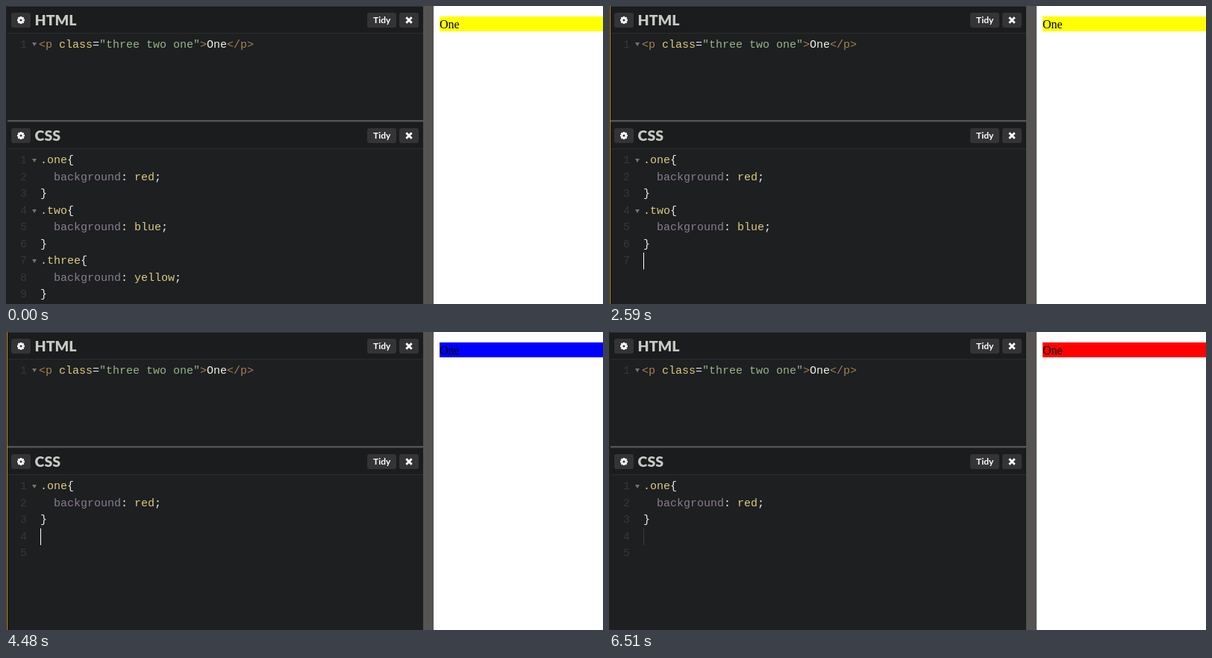
Recreate the animation shown at these times as an HTML page. Size 800 by 400 pixels, loop 6580 ms.

```html
<!DOCTYPE html>
<html lang="en">
<head>
<meta charset="utf-8">
<style>
  html, body { margin: 0; width: 100%; height: 100%; overflow: hidden; background: #fff; }
  svg { display: block; }
  text { white-space: pre; }
  .code { font: 15px "Liberation Mono", monospace; fill: #f0f0ea; }
  .title { font: 900 19.5px Lato, sans-serif; fill: #c7c9c4; }
  .label { font: 700 12px Lato, sans-serif; fill: #fff; text-anchor: middle; }
  .page { font: 16px "Liberation Serif", serif; }
  .num { fill: #35383a; }
  .tag { fill: #a7804f; }
  .name { fill: #ddca7e; }
  .str { fill: #96b38a; }
  .prop { fill: #8a7d92; }
</style>
</head>
<body>
<svg id="stage" width="800" height="400" viewBox="0 0 800 400"></svg>
<script>
const LOOP = 6580, STEP = 70, BLINK = 530;
const LEFT = 46, TOP = 196, ROW = 22.5, CHAR = 9, RIGHT = 555;

// Pointer runs: [time, x, y] with straight moves between; hidden outside.
const runs = [
  [[280, 488, 396], [420, 397, 387], [630, 244, 387], [770, 165, 387], [910, 73, 388],
   [980, 58, 387], [1120, 48, 368], [1190, 40, 352], [1260, 32, 348], [1400, 30, 347],
   [1610, 30, 347], [1750, 60, 311], [1960, 123, 366], [2100, 175, 350], [2169, 175, 350]],
  [[2800, 158, 372], [2940, 158, 372], [3150, 108, 350], [3360, 79, 326], [3570, 58, 322],
   [3640, 57, 320], [3780, 48, 292], [3850, 41, 278], [3990, 40, 286], [4339, 40, 286]],
  [[4830, 40, 286], [5110, 438, 367], [5460, 550, 392], [5529, 550, 392]]
];
// Drags select upwards from the brace in lastRow, then the block is deleted.
const drags = [
  { start: 980, stop: 1260, cut: 2170, lastRow: 8 },
  { start: 3640, stop: 3850, cut: 4340, lastRow: 5 }
];
const blinkStarts = [1260, 2170, 3850, 4340, 6370];
const rules = [['one', 'red'], ['two', 'blue'], ['three', 'yellow']];

const rect = (x, y, w, h, fill, r = 0) =>
  `<rect x="${x}" y="${y}" width="${w}" height="${h}" rx="${r}" fill="${fill}"/>`;
const text = (x, y, cls, s) => `<text x="${x}" y="${y}" class="${cls}">${s}</text>`;
const span = (cls, s) => `<tspan class="${cls}">${s}</tspan>`;
const rowTop = row => TOP + row * ROW;
const baseline = row => Math.round(rowTop(row) + 15.4);
const fold = y => `<path d="M35 ${y}h6l-3 5z" fill="#73756f"/>`;

function gear(y) {
  const teeth = [0, 45, 90, 135].map(a =>
    `<rect x="-1.2" y="-5" width="2.4" height="10" transform="rotate(${a})"/>`).join('');
  return `<g transform="translate(20 ${y})" fill="#fff">${teeth}<circle r="3.8"/>
    <circle r="1.6" fill="#343436"/></g>`;
}

function panel(y, height, title) {
  return rect(2, y, 557, height, '#1d1f20') + rect(2, y, 557, 36, '#1a1c1d') +
    rect(2, y, 557, 1, '#343436') + rect(2, y + 36, 557, 1, '#292b2c') +
    [[7, 26], [484, 39], [527, 26]].map(([x, w]) => rect(x, y + 9, w, 20, '#343436', 3)).join('') +
    gear(y + 19) + text(38.6, y + 25.8, 'title', title) + text(503.7, y + 23, 'label', 'Tidy') +
    `<path d="M536.3 ${y + 15.3}l7.4 7.4m0 -7.4l-7.4 7.4" stroke="#fff" stroke-width="2.8"/>`;
}

const chrome = rect(0, 0, 573, 400, '#565453') + panel(0, 153, 'HTML') + panel(155, 245, 'CSS') +
  text(19, 56, 'code num', '1') + fold(49) +
  text(44, 56, 'code', span('tag', '&lt;p ') + span('name', 'class') + '=' +
    span('str', '"three two one"') + span('tag', '&gt;') + 'One' + span('tag', '&lt;/p&gt;'));

function pointerAt(t) {
  const run = runs.find(r => t >= r[0][0] && t <= r[r.length - 1][0]);
  if (!run) return null;
  const i = Math.max(1, run.findIndex(p => p[0] >= t));
  const [t0, x0, y0] = run[i - 1], [t1, x1, y1] = run[i];
  const k = (t - t0) / (t1 - t0);
  return { x: x0 + (x1 - x0) * k, y: y0 + (y1 - y0) * k };
}

// I-beam over code, hand over the fold marks, arrow elsewhere.
function drawPointer({ x, y }, lineCount) {
  const at = (d, style) =>
    `<path transform="translate(${Math.round(x)} ${Math.round(y)})" d="${d}" ${style}/>`;
  const white = 'fill="#fff" stroke="#000" stroke-linejoin="round"';
  if (x > LEFT && y < rowTop(lineCount))
    return at('M-3 -7.5h2.5l.5 .5l.5 -.5h2.5M0 -7v14M-3 7.5h2.5l.5 -.5l.5 .5h2.5',
      'fill="none" stroke="#050606" stroke-width="1.2"');
  if (x > 34 && x <= LEFT)
    return at('M-2 1.5Q-2 -.5 0 -.5T2 1.5V7Q4 6 5 8Q7 7 7.5 9Q9.5 8.5 9.5 11V15Q9.5 18 7 21.5H-1' +
      'Q-2 18 -5 14.5Q-7 11.5 -5 11Q-3.5 11 -2 13Z', white);
  return at('M-.5 -1V16.5L3.5 12.7L6.2 18.8L9 17.6L6.3 11.7H11.8Z', white);
}

function headOf(drag, t) {
  const { x, y } = pointerAt(Math.min(t, drag.stop));
  return {
    row: Math.min(drag.lastRow, Math.floor((y - TOP) / ROW)),
    x: LEFT + CHAR * Math.max(0, Math.round((x - LEFT) / CHAR))
  };
}

function drawSelection({ lastRow }, { row, x }) {
  const color = '#363839';
  if (row === lastRow) return rect(x, rowTop(row), Math.max(0, LEFT + CHAR - x), ROW, color);
  return rect(x, rowTop(row), RIGHT - x, ROW, color) +
    rect(LEFT, rowTop(row + 1), RIGHT - LEFT, (lastRow - row - 1) * ROW, color) +
    rect(LEFT, rowTop(lastRow), CHAR, ROW, color);
}

function drawRule([name, value], i) {
  const row = i * 3, line = (n, s) => text(LEFT, baseline(row + n), 'code', s);
  return fold(baseline(row) - 6) + line(0, span('name', '.' + name) + '{') +
    line(1, '  ' + span('prop', 'background') + ': ' + span('name', value) + ';') + line(2, '}');
}

function scene(t) {
  const ruleCount = 3 - drags.filter(d => t >= d.cut).length;
  const lineCount = 3 + ruleCount * 2;
  const drag = drags.filter(d => t >= d.start).pop();
  const head = drag && headOf(drag, t);
  const pointer = pointerAt(t);
  const last = t >= 6510;
  const pageColor = t < 2660 ? '#ff0' : t < 5180 ? '#00f' : '#f00';
  let out = chrome + rect(0, 0, 2, 400, '#1d1f20');

  // The window edge lights up while the editor has focus.
  if (drag && !last) out += rect(1, 0, 1, 400, '#c8912a');
  if (drag && t < drag.cut) out += drawSelection(drag, head);
  for (let row = 0; row < lineCount; row++) out += text(19, baseline(row), 'code num', row + 1);
  out += rules.slice(0, ruleCount).map(drawRule).join('');

  if (drag) {
    const since = t - (blinkStarts.filter(b => b <= t).pop() ?? t);
    const dragging = t < drag.stop;
    if (dragging || Math.floor(since / BLINK) % 2 === 0)
      out += rect(head.x, rowTop(head.row), 1, ROW, last ? '#3a3d3e' : '#fff');
  }
  out += rect(573, 0, 227, 400, '#fff') + rect(581, 14, 219, 20, pageColor) +
    text(581, 30, 'page', 'One');
  return pointer ? out + drawPointer(pointer, lineCount) : out;
}

const stage = document.getElementById('stage');
let shown = -1;
function tick() {
  const t = Math.floor(performance.now() % LOOP / STEP) * STEP;
  if (t !== shown) stage.innerHTML = scene(shown = t);
  requestAnimationFrame(tick);
}
tick();
</script>
</body>
</html>
```
